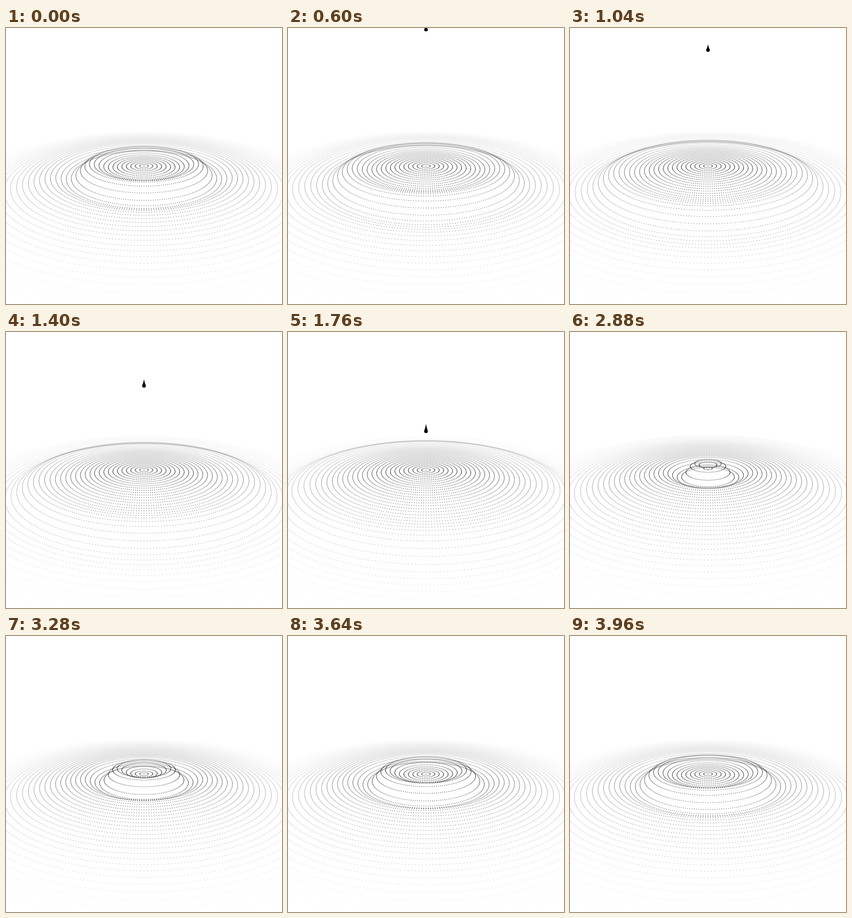
Recreate the animation shown at these times as an HTML page with a canvas. Size 500 px wide and 500 px high, loop 4 s.

```html
<!DOCTYPE html>
<html lang="en">
<head>
<meta charset="utf-8">
<title>Ripple</title>
<style>
html, body { margin: 0; width: 100%; height: 100%; overflow: hidden; background: #fff; }
canvas { display: block; }
</style>
</head>
<body>
<canvas id="stage" width="500" height="500"></canvas>
<script>
const ctx = document.getElementById('stage').getContext('2d');
const LOOP = 4000, STEP = 40, IMPACT = 2000;
const CENTER = 250, CAMERA = 450, TILT = Math.PI / 9;
const SIN = Math.sin(TILT), COS = Math.cos(TILT);
const RINGS = 38, GAP = 8, DOTS_PER_RING = 16, FADE_RADIUS = 312, DOT = 1.1;

// x: across, near: towards the viewer on the water plane, up: height above it
function project(x, near, up) {
  const scale = CAMERA / (CAMERA - near * COS - up * SIN);
  return [CENTER + x * scale, CENTER + (near * SIN - up * COS) * scale, scale];
}

// A trough followed by a crest, travelling outwards, widening and dying down
function wave(radius, age) {
  const front = 0.065 * age - 17 - 13 * Math.exp((400 - age) / 300);
  const x = (radius - front) / (16 + age / 220);
  const height = 13 * Math.exp(-((front / 240) ** 2));
  return -height * 2.33 * x * Math.exp(-x * x) * Math.min(1, radius / 12);
}

function drawRing(index, age) {
  const radius = index * GAP;
  const up = wave(radius, age) + wave(radius, age + LOOP);
  const count = Math.max(1, index * DOTS_PER_RING);
  const fade = (1 - radius / FADE_RADIUS) ** 1.25;
  for (let i = 0; i < count; i++) {
    const angle = i / count * 2 * Math.PI;
    const [x, y, scale] = project(radius * Math.sin(angle), radius * Math.cos(angle), up);
    ctx.globalAlpha = Math.min(1, fade * scale);
    ctx.fillRect(x - DOT / 2, y - DOT / 2, DOT, DOT);
  }
}

function drawDrop(t) {
  const progress = t / IMPACT;
  if (progress > 1.1) return;
  const bottom = project(0, 0, 224.5 * (1 - progress ** 2.8))[1];
  const length = 9 + 8.5 * progress, radius = 3.4;
  const middle = bottom - radius, top = bottom - length;
  ctx.save();
  ctx.globalAlpha = 1;
  ctx.beginPath();
  ctx.rect(0, 0, 500, CENTER);
  ctx.clip();
  ctx.beginPath();
  ctx.moveTo(CENTER, top);
  ctx.quadraticCurveTo(CENTER + 1, (top + middle) / 2, CENTER + radius, middle);
  ctx.arc(CENTER, middle, radius, 0, Math.PI);
  ctx.quadraticCurveTo(CENTER - 1, (top + middle) / 2, CENTER, top);
  ctx.fill();
  ctx.restore();
}

function draw(now) {
  const t = Math.floor(now % LOOP / STEP) * STEP;
  const age = (t + LOOP - IMPACT) % LOOP;
  ctx.globalAlpha = 1;
  ctx.fillStyle = '#fff';
  ctx.fillRect(0, 0, 500, 500);
  ctx.fillStyle = '#000';
  for (let index = 0; index <= RINGS; index++) drawRing(index, age);
  drawDrop(t);
}

const start = performance.now();
function tick() {
  draw(performance.now() - start);
  requestAnimationFrame(tick);
}
tick();
</script>
</body>
</html>
```
